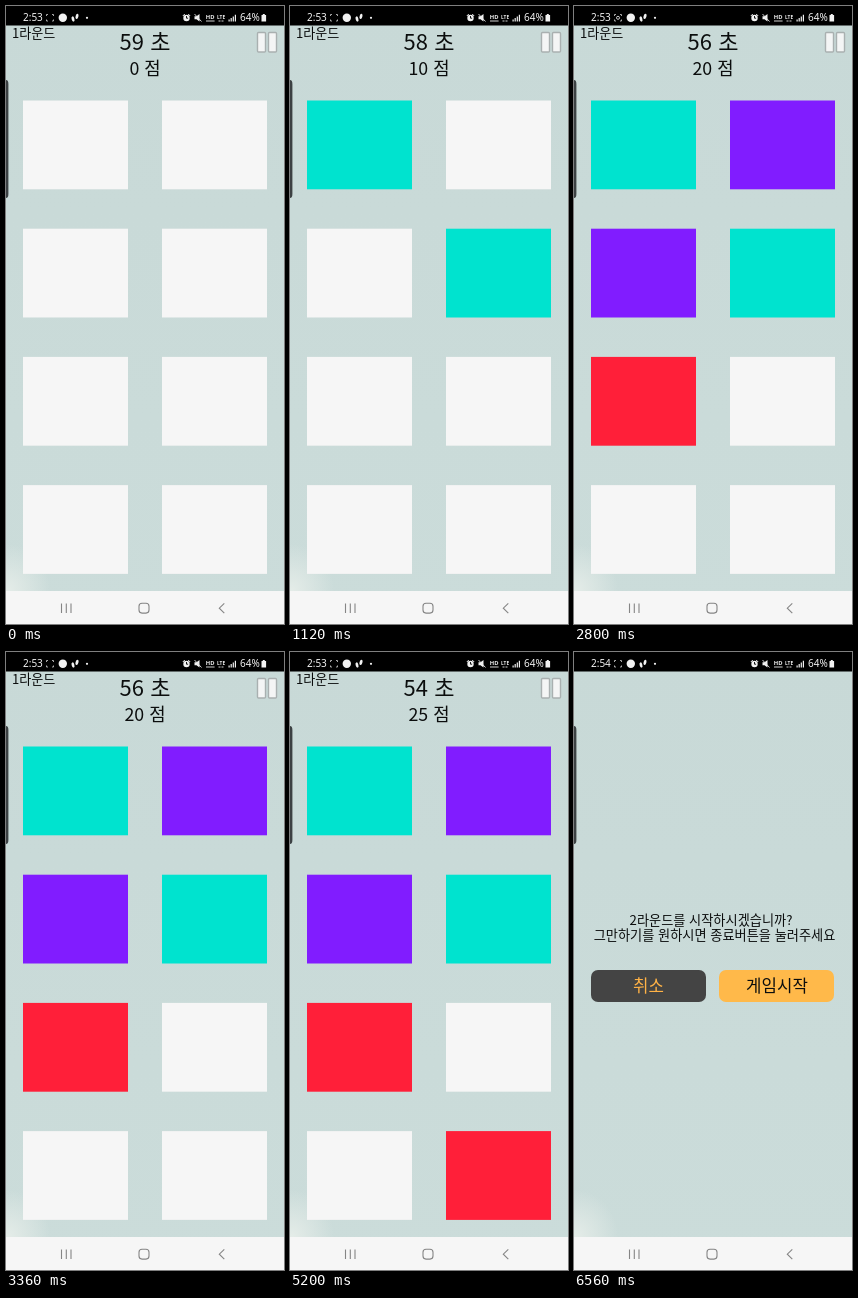
These frames come from a looping animation (278 by 618 pixels, 6.64 s). An HTML page:

```html
<!DOCTYPE html>
<html lang="ko">
<head>
<meta charset="utf-8">
<title>Card match</title>
<style>
  html, body { margin: 0; width: 100%; height: 100%; overflow: hidden; background: #c9dad8; }
  svg { display: block; width: 278px; height: 618px; }
  text { font-family: "Noto Sans CJK KR", "Noto Sans CJK", "Noto Sans", sans-serif; fill: #0b0d0d; }
  .mid { text-anchor: middle; }
  .status text { font-family: "Noto Sans", Roboto, sans-serif; fill: #f2f2f2; }
  .line { fill: none; stroke: #858585; stroke-width: 1.1; }
  .medium { font-weight: 500; }
</style>
</head>
<body>
<svg viewBox="0 0 278 618">
  <defs>
    <linearGradient id="sky" x2="0" y2="1">
      <stop offset="0" stop-color="#c8d9d7"/>
      <stop offset="1" stop-color="#cbdcda"/>
    </linearGradient>
    <radialGradient id="haze">
      <stop offset="0" stop-color="#e4ece8"/>
      <stop offset="1" stop-color="#e4ece8" stop-opacity="0"/>
    </radialGradient>
  </defs>

  <rect width="278" height="618" fill="url(#sky)"/>
  <ellipse cx="2" cy="584" rx="42" ry="46" fill="url(#haze)"/>

  <g id="game">
    <text x="6" y="31.5" font-size="13.1">1라운드</text>
    <text id="timer" class="mid medium" x="139" y="43.5" font-size="22"></text>
    <text id="score" class="mid medium" x="139" y="68.5" font-size="17.8"></text>
    <g fill="#f4f5f5" stroke="#a9b0b0" stroke-width="1.4">
      <rect x="251.5" y="26.5" width="8" height="19.5" rx="1"/>
      <rect x="262.5" y="26.5" width="8" height="19.5" rx="1"/>
    </g>
    <g id="cards"></g>
  </g>

  <g id="dialog" class="mid" font-size="13.2">
    <text x="137" y="272.8">2라운드를 시작하시겠습니까?</text>
    <text x="140.5" y="287.6">그만하기를 원하시면 종료버튼을 눌러주세요</text>
    <rect x="17" y="318" width="115" height="32" rx="7" fill="#444"/>
    <rect x="145" y="318" width="115" height="32" rx="7" fill="#ffb94a"/>
    <g class="medium" font-size="16.8">
      <text x="74.5" y="340.2" style="fill:#ffb246">취소</text>
      <text x="203" y="340.2">게임시작</text>
    </g>
  </g>

  <path d="M0 74q2.4 0 2.4 4v110q0 4-2.4 4z" fill="#3c4143"/>

  <g class="status">
    <rect width="278" height="19.5"/>
    <text id="clock" x="17" y="15" font-size="10"></text>
    <path d="M40.5 10V8.5H42M46 8.5h1.5V10M40.5 13.5V15H42M46 15h1.5v-1.5" fill="none" stroke="#bbb" stroke-width=".9"/>
    <circle id="recorder" cx="44" cy="11.8" r="1.5" fill="none" stroke="#ddd" stroke-width=".9"/>
    <g fill="#f2f2f2">
      <circle cx="56.8" cy="11.7" r="4.2"/>
      <ellipse cx="67" cy="13" rx="1.4" ry="2.7" transform="rotate(-15 67 13)"/>
      <ellipse cx="71" cy="10.4" rx="1.4" ry="2.7" transform="rotate(15 71 10.4)"/>
      <circle cx="81" cy="11.8" r="1.1"/>
      <circle cx="180.5" cy="12" r="3.2"/>
      <path d="M176.8 10l2-2M184.2 10l-2-2" stroke="#f2f2f2"/>
      <path d="M188.5 10.3h2l3-2.3v7.6l-3-2.3h-2z"/>
      <path d="M222.5 15.5v-2h1.2v2zM224.6 15.5v-3.5h1.2v3.5zM226.7 15.5v-5h1.2v5zM228.8 15.5V8.8h1.2v6.7z"/>
      <path d="M255.5 9h1.3V8h2v1h1.3v6.6h-4.6z"/>
    </g>
    <path d="M180.5 10v2.2h1.6" fill="none" stroke="#000" stroke-width=".9"/>
    <path d="M188.5 8l7 7.5M200 15h8.6M212.5 15h2m1 0h2" stroke="#e8e8e8" stroke-width=".9"/>
    <text x="199.8" y="13" font-size="5.8" font-weight="700">HD</text>
    <text x="211" y="12.6" font-size="4.8" font-weight="700">LTE</text>
    <text x="234" y="15" font-size="10">64%</text>
  </g>

  <rect y="585" width="278" height="33" fill="#f6f6f6"/>
  <g class="line">
    <path d="M55.5 597.5v9.5M60.3 597.5v9.5M65 597.5v9.5"/>
    <rect x="133" y="597.3" width="10" height="9.8" rx="3"/>
    <path d="M218.3 597.3l-5 4.9 5 4.9"/>
  </g>
</svg>

<script>
  const LOOP = 6640, DIALOG_AT = 6480;
  const WHITE = '#f6f6f6', TEAL = '#00e3cf', PURPLE = '#811cff', RED = '#ff1f39', ORANGE = '#ffa000';

  // Each track lists [start time, value]; cards run left to right, top to bottom.
  const cardTracks = [
    [[400, TEAL]],
    [[1600, PURPLE]],
    [[2080, PURPLE]],
    [[880, TEAL]],
    [[2640, RED], [4240, WHITE], [4640, RED]],
    [[6240, ORANGE]],
    [[3440, ORANGE], [4240, WHITE], [5760, ORANGE]],
    [[5120, RED]]
  ];
  const scoreTrack = [[880, 10], [2080, 20], [4240, 15], [5120, 25], [6240, 35]];
  const recorderTrack = [[2400, true], [3000, false], [4200, true], [4720, false]];

  const valueAt = (track, t, first) =>
    track.reduce((value, [start, next]) => t >= start ? next : value, first);
  const byId = id => document.getElementById(id);
  const show = (id, on) => byId(id).style.display = on ? '' : 'none';
  const write = (id, text) => {
    if (byId(id).textContent !== text) byId(id).textContent = text;
  };

  const cards = cardTracks.map((_, i) => {
    const card = document.createElementNS('http://www.w3.org/2000/svg', 'rect');
    const box = { x: 17 + i % 2 * 139, y: 94.5 + (i >> 1) * 128.2, width: 105, height: 88.8 };
    for (const key in box) card.setAttribute(key, box[key]);
    return byId('cards').appendChild(card);
  });

  function draw(t) {
    const ended = t >= DIALOG_AT;
    show('game', !ended);
    show('dialog', ended);
    show('recorder', valueAt(recorderTrack, t, false));
    write('clock', ended ? '2:54' : '2:53');
    write('timer', `${59 - Math.floor((t + 360) / 1000)} 초`);
    write('score', `${valueAt(scoreTrack, t, 0)} 점`);
    cards.forEach((card, i) => card.setAttribute('fill', valueAt(cardTracks[i], t, WHITE)));
  }

  const start = performance.now();
  function tick() {
    draw((performance.now() - start) % LOOP);
    requestAnimationFrame(tick);
  }
  tick();
</script>
</body>
</html>
```
